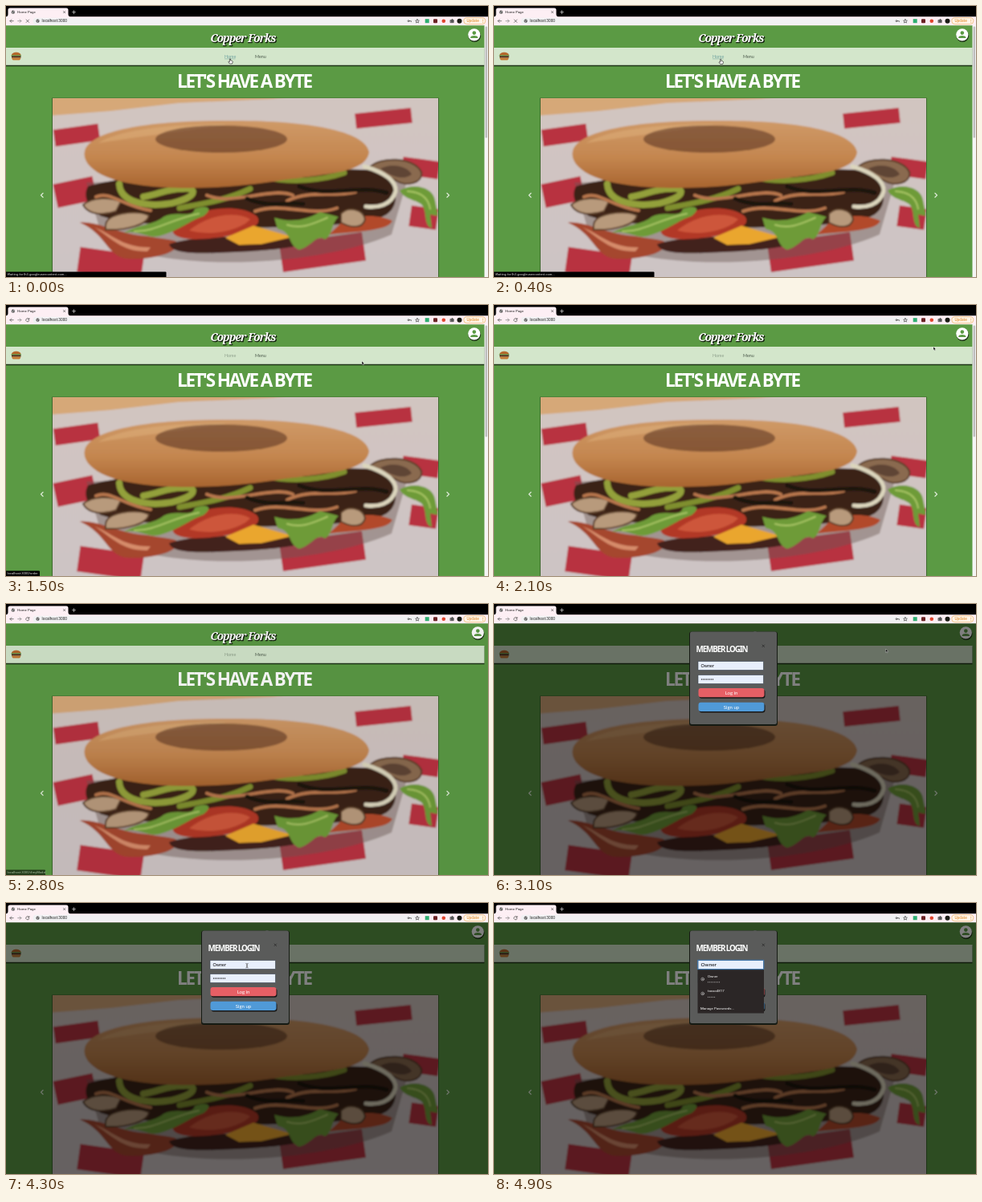
These frames come from a looping animation (600 by 338 pixels, 5000 ms). An HTML page:

```html
<!DOCTYPE html>
<html lang="en">
<head>
<meta charset="utf-8">
<title>Home Page</title>
<style>
html, body { margin: 0; width: 100%; height: 100%; overflow: hidden; background: #000; }
svg { display: block; width: 100%; height: 100%; }
text { font-family: Lato, sans-serif; font-size: 5.4px; }
.ui { font-family: Roboto, sans-serif; font-size: 4.8px; }
.small { font-family: Roboto, sans-serif; font-size: 4.4px; fill: #fff; }
.head { font: 800 22.4px "Noto Sans", sans-serif; letter-spacing: -2.1px; text-anchor: middle; fill: #fff; }
.login { font: 800 9.8px "Noto Sans", sans-serif; letter-spacing: -1.1px; fill: #fff; }
.brand { font: italic 700 14px "Noto Serif", serif; letter-spacing: -1.1px; text-anchor: middle; }
.mid { text-anchor: middle; fill: #fff; font-size: 6px; }
.line { fill: none; stroke-linecap: round; stroke-linejoin: round; }
#tab { font-size: 4.4px; }
#link { font-size: 4.1px; }
</style>
</head>
<body>
<svg viewBox="0 0 600 338" preserveAspectRatio="none">
  <defs>
    <linearGradient id="bun" x2="0" y2="1">
      <stop offset="0" stop-color="#cf9a68"/><stop offset=".55" stop-color="#c4864f"/><stop offset="1" stop-color="#a8642f"/>
    </linearGradient>
    <linearGradient id="paper" x2="0" y2="1">
      <stop offset="0" stop-color="#d2c5c0"/><stop offset="1" stop-color="#cdc4c5"/>
    </linearGradient>
    <filter id="soft"><feGaussianBlur stdDeviation="1"/></filter>
    <clipPath id="frame"><path d="M58 115H538V338H58z"/></clipPath>
    <g id="globe"><circle r="2.1" fill="#444"/><path d="M-1.4 -.6L0 0L-.4 1.4M.6 -1.3L1.4 -.2" class="line" stroke="#fff" stroke-width=".6"/></g>
    <g id="key" class="line" stroke="#bbb" stroke-width=".6"><circle r="1.9"/><path d="M0 -1V.4M-.7 .5H.7"/></g>
  </defs>

  <!-- page -->
  <path fill="#5b9a44" d="M0 24H600V338H0z"/>
  <text class="brand" x="295.800" y="46.400" fill="#16240f" stroke="#16240f" stroke-width=".7">Copper Forks</text>
  <text class="brand" x="294.900" y="45.200" fill="#fff">Copper Forks</text>
  <path fill="#1e3317" d="M0 53H595.5V75.2H0z"/>
  <path fill="#d3e6cb" d="M0 52H595.5V73.8H0z"/>
  <path fill="#b5682c" d="M7 61.5C7 56.5 18.5 56.5 18.5 61.5z"/>
  <path fill="#4f8a2c" d="M6.6 61.3H18.8V62.6H6.6z"/>
  <path fill="#4b2416" d="M7 62.5H18.5V64.5H7z"/>
  <path fill="#c37a35" d="M7.2 64.5H18.3Q18.3 67.6 15.5 67.6H10Q7.2 67.6 7.2 64.5z"/>
  <text id="home" x="272" y="64.8">Home</text>
  <path id="under" d="M272 65.9H285.5" stroke="#6fa3a0" stroke-width=".5"/>
  <text x="310" y="64.8" fill="#4a584a">Menu</text>
  <g id="account">
    <circle cx="583.3" cy="37.3" r="7.8" fill="#1e3317"/>
    <circle cx="582.8" cy="35.8" r="7.6" fill="#fff"/>
    <circle cx="582.8" cy="33.6" r="2.3" fill="#5b9a44"/>
    <path fill="#5b9a44" d="M578.2 40V39.2C578.2 36.2 587.4 36.2 587.4 39.2V40z"/>
  </g>
  <text class="head" x="296.5" y="102.3">LET'S HAVE A BYTE</text>

  <!-- picture -->
  <path fill="#2c4a20" opacity=".6" d="M57 114.5H539V338H57z"/>
  <g clip-path="url(#frame)"><g filter="url(#soft)">
    <path fill="url(#paper)" d="M50 105H550V345H50z"/>
    <path fill="#d6a878" d="M50 105H420L330 116L215 121L130 131L50 137z"/>
    <g id="patches" fill="#b8303f"></g>
    <path fill="#6d5a55" opacity=".45" d="M120 290C200 335 390 325 480 285L500 215L100 220z"/>
    <path fill="#3a2217" d="M102 225C160 205 400 200 462 205C490 220 492 252 470 262C430 282 170 280 118 262C100 250 96 236 102 225z"/>
    <path fill="#a5462f" d="M92 270C115 268 140 285 175 287C200 292 218 290 213 300C205 312 170 317 148 315C125 310 125 285 92 270z"/>
    <path fill="#d68c6b" d="M110 276C130 283 145 302 180 301L176 306C145 307 132 290 110 276z"/>
    <path fill="#43201b" d="M203 297C240 284 320 288 372 290C385 300 330 306 262 308C230 309 206 308 203 297z"/>
    <path fill="#b23725" d="M208 277C230 252 290 244 312 262C325 278 280 290 235 291C215 290 205 286 208 277z"/>
    <path fill="#cd573b" d="M228 280C250 261 285 255 304 266C292 279 258 288 228 280z"/>
    <path fill="#b24a2c" d="M420 268C445 258 470 262 481 268C476 280 442 281 402 285z"/>
    <path fill="#eaa62f" d="M273 289L308 274L357 288L318 297L290 298z"/>
    <g fill="#b89a7c" stroke="#5a3c28" stroke-width="2">
      <path d="M124 273C126 258 162 254 178 261C176 273 150 280 124 279z"/>
      <path d="M96 248C108 238 130 238 143 244L137 256C120 262 102 260 96 248z"/>
      <path d="M417 259C427 249 445 254 447 266C444 279 427 276 417 270z"/>
      <path fill="#8a6a50" d="M452 202C465 187 508 188 517 207C520 221 497 226 486 218z"/>
    </g>
    <path fill="#5f4436" d="M466 203C480 195 500 200 505 210C495 218 480 213 466 203z"/>
    <g class="line">
      <path stroke="#93a03a" stroke-width="8" d="M141 222C142 246 178 251 206 246C238 239 240 226 220 228C200 228 190 235 171 238"/>
      <path stroke="#7f8f2e" stroke-width="7" d="M216 252C248 246 275 242 304 228M318 212C355 222 395 217 421 208"/>
      <path stroke="#b9774d" stroke-width="4" d="M112 238C130 230 145 250 180 255M250 236C280 250 330 225 357 236M350 243C380 229 405 239 435 232M310 256C345 244 380 264 412 252"/>
      <path stroke="#1e1310" stroke-width="5" d="M300 240C325 252 350 244 370 247M365 225C400 240 440 222 474 233"/>
      <path stroke="#dcd6bd" stroke-width="5" d="M446 200C475 209 486 220 485 231C480 249 462 252 448 250"/>
    </g>
    <g fill="#6e9b39">
      <path d="M147 283C165 272 185 273 196 263C214 254 232 266 235 253C250 247 259 252 246 262C228 268 217 279 194 286C178 292 165 278 147 283z"/>
      <path d="M334 264C360 272 378 264 391 257L414 263C405 270 407 286 397 291C386 284 382 299 365 304C350 298 357 282 338 278z"/>
      <path d="M490 230C508 220 531 226 534 242L538 262L528 260L530 277C518 273 526 252 515 246C506 241 495 240 490 230z"/>
    </g>
    <path class="line" stroke="#a9c565" stroke-width="2" d="M160 281C185 282 208 265 240 259M350 273C370 279 385 270 400 264M500 231C518 232 526 241 528 253"/>
    <path fill="url(#bun)" d="M98 181C105 156 172 143 275 143C367 142 447 154 452 182C449 207 405 209 345 217C274 229 174 233 125 213C106 205 95 193 98 181z"/>
    <path fill="#e1b37f" opacity=".45" d="M115 171C145 151 230 147 275 148C220 157 155 164 115 171z"/>
    <ellipse cx="268" cy="166" rx="82" ry="17" fill="#4a2718" opacity=".5"/>
  </g></g>
  <path class="line" stroke="#d9e8d2" stroke-width="1.3" d="M46 233.5L43.5 236L46 238.5M549 233.5L551.5 236L549 238.5"/>

  <g id="scroll">
    <path fill="#f5f5f5" d="M595.5 24H600V338H595.5z"/>
    <rect x="596.6" y="25.5" width="2.5" height="139" rx="1.2" fill="#bdbdbd"/>
  </g>
  <path id="shade" d="M0 24H600V338H0z"/>

  <!-- dialog -->
  <g id="dialog">
    <rect x="243" y="34.5" width="110" height="117.5" rx="3" fill="#151a13"/>
    <rect x="244" y="34.5" width="108" height="115.5" rx="2.5" fill="#5a5b5a"/>
    <text class="login" x="251.5" y="60.3">MEMBER LOGIN</text>
    <path class="line" stroke="#222" stroke-width=".7" d="M334 51L336.6 53.6M336.6 51L334 53.6"/>
    <path fill="#e8effc" stroke="#38404c" stroke-width=".6" d="M254 71.5H335.5V82.5H254zM254 88.5H335.5V99.5H254z"/>
    <text id="user" x="257.5" y="78.8">Owner</text>
    <g id="dots" fill="#222"></g>
    <rect x="255.5" y="106.5" width="82" height="11.3" rx="3" fill="#171717"/>
    <rect x="254.5" y="105" width="82" height="11.3" rx="3" fill="#e65f65"/>
    <text class="mid" x="295.5" y="112.8">Log in</text>
    <rect x="255.5" y="124.3" width="82" height="11.3" rx="3" fill="#171717"/>
    <rect x="254.5" y="122.8" width="82" height="11.3" rx="3" fill="#509ad8"/>
    <text class="mid" x="295.5" y="130.5">Sign up</text>
    <g id="list">
      <path fill="#2b2626" d="M253.5 83H336V137.5H253.5z"/>
      <path fill="none" stroke="#3f83c4" stroke-width=".9" d="M253.7 71.3H335.8V82.7H253.7z"/>
      <use href="#key" x="259.7" y="95"/><use href="#key" x="259.7" y="113"/>
      <text class="small" x="266" y="93">Owner</text>
      <text class="small" x="266" y="111.3">tasso4817</text>
      <g id="masks" fill="#ddd"></g>
      <text class="small" x="257" y="132.5">Manage Passwords...</text>
    </g>
  </g>

  <!-- browser -->
  <path d="M0 0H600V13H0z"/>
  <path fill="#fdeff4" d="M0 13.2C2 13.2 2.5 12 2.5 10V5Q2.5 2.5 5 2.5H75Q77.5 2.5 77.5 5V10C77.5 12 78 13.2 80 13.2H600V24.3H0z"/>
  <use href="#globe" x="8.8" y="7.7"/>
  <text id="tab" class="ui" x="14" y="9.4" fill="#222">Home Page</text>
  <path class="line" stroke="#333" stroke-width=".6" d="M71.5 6.5L73.7 8.7M73.7 6.5L71.5 8.7"/>
  <path class="line" stroke="#ddd" stroke-width=".7" d="M82.5 7.7H86.5M84.5 5.7V9.7"/>
  <rect x="33.5" y="14.7" width="484" height="8.2" rx="4.1" fill="#f1f1f3"/>
  <g class="line" stroke="#555" stroke-width=".75">
    <path d="M9.2 18.7H5M6.8 16.9L5 18.7L6.8 20.5"/>
    <path stroke="#888" d="M14.7 18.7H18.9M17.1 16.9L18.9 18.7L17.1 20.5"/>
    <path id="stop" d="M25.2 17L28.6 20.4M28.6 17L25.2 20.4"/>
    <path id="reload" d="M28.5 17.4A2.1 2.1 0 1 0 28.9 19.3M28.9 16.5V18H27.4"/>
    <circle cx="501" cy="18.7" r="1"/><path d="M502 18.7H504.4V19.7"/>
    <path d="M512 16.5L512.7 18.1L514.4 18.2L513.1 19.3L513.5 21L512 20.1L510.5 21L510.9 19.3L509.6 18.2L511.3 18.1z"/>
    <path d="M553.3 17.5H555V16.5H556V17.5H557.2V20.7H553.3z" fill="#555"/>
  </g>
  <use href="#globe" x="39.5" y="18.7"/>
  <text class="ui" x="44.5" y="20.4" fill="#222">localhost:3000</text>
  <rect x="521.7" y="16.2" width="5" height="5" fill="#2fae72"/>
  <rect x="532" y="16.2" width="5" height="5" rx="1" fill="#6b2224"/>
  <circle cx="544.8" cy="18.7" r="2.3" fill="#e0452f"/>
  <circle cx="564.5" cy="18.7" r="3" fill="#1b1c16"/>
  <rect x="569.8" y="14.7" width="27" height="8" rx="4" fill="#fff5e9" stroke="#eda64c" stroke-width=".6"/>
  <text class="ui" x="573.5" y="20.4" fill="#df8620">Update</text>
  <path stroke="#df8620" stroke-width=".8" stroke-dasharray=".8 .8" d="M593.7 16.7V21"/>

  <g id="status">
    <path id="bubble"/>
    <text id="link" class="ui" x="1.5" y="336.4" fill="#ddd"></text>
  </g>

  <g id="cursor">
    <path id="arrow" fill="#000" stroke="#fff" stroke-width=".35" d="M0 0V4.3L1 3.4L1.7 4.9L2.4 4.6L1.7 3.2H3z"/>
    <path id="hand" fill="#fff" stroke="#111" stroke-width=".6" d="M-.6 0Q0 -.6 .6 0V2L2.7 2.5Q3.4 2.8 3.2 3.7L2.5 6H-.6L-2.2 3.7Q-2 2.7 -.6 3.7z"/>
    <path id="beam" class="line" stroke="#555" stroke-width=".7" d="M-1.2 -2.5Q0 -2.5 0 -1.7V2Q0 2.8 -1.2 2.8M1.2 -2.5Q0 -2.5 0 -1.7V2Q0 2.8 1.2 2.8"/>
  </g>
</svg>
<script>
const $ = id => document.getElementById(id);
const clamp = v => Math.max(0, Math.min(1, v));
const show = (id, alpha) => $(id).setAttribute("opacity", +alpha);
const move = (id, x, y) => $(id).setAttribute("transform", `translate(${x} ${y})`);

// x, y, width, height, angle
const patches = [
  [88, 161, 56, 21, -8], [470, 140, 70, 19, -6], [86, 232, 50, 30, -12], [516, 202, 46, 22, 8],
  [130, 322, 80, 32, 8], [394, 307, 104, 36, -8], [520, 264, 34, 26, 8]
];
$("patches").innerHTML = patches.map(([x, y, w, h, a]) =>
  `<rect x="${-w / 2}" y="${-h / 2}" width="${w}" height="${h}" transform="translate(${x} ${y}) rotate(${a})"/>`).join("");

const dots = (n, x, y, gap, r) => Array.from({ length: n }, (_, i) =>
  `<circle cx="${x + i * gap}" cy="${y}" r="${r}"/>`).join("");
$("dots").innerHTML = dots(8, 258.5, 94, 2, .7);
$("masks").innerHTML = dots(8, 266.6, 98.8, 2, .5) + dots(5, 266.6, 117.2, 2, .5);

// time, x, y
const path = [
  [0, 279, 66], [800, 285.5, 67], [1000, 290, 66], [1500, 443, 70],
  [2100, 547, 52], [2500, 584, 38], [2800, 584, 38], [3600, 327, 86], [4300, 300, 78], [5000, 286, 92]
];
function pointer(t) {
  const i = path.findIndex(p => p[0] > t), [t0, x0, y0] = path[i - 1], [t1, x1, y1] = path[i];
  const k = (t - t0) / (t1 - t0);
  return [x0 + (x1 - x0) * k, y0 + (y1 - y0) * k];
}

// start, fade start, width, text
const links = [
  [0, 700, 199.5, "Waiting for lh3.googleusercontent.com..."],
  [1100, 1500, 42, "localhost:3000/order"],
  [2400, 2700, 49, "localhost:3000/#myModal"]
];

function draw(now) {
  const t = Math.floor(now % 5000 / 100) * 100;
  const loading = t < 500, hover = t < 1000;
  const modal = t >= 2800, fade = clamp((t - 2800) / 150), slide = clamp((t - 2700) / 300);
  const list = t >= 4600, preview = t >= 4900;

  show("stop", loading);
  show("reload", !loading);
  $("home").setAttribute("fill", hover ? "#6fa3a0" : "#8fa08c");
  show("under", hover);
  show("scroll", !modal);
  move("account", modal ? 4.5 : 0, 0);
  show("shade", modal ? Math.max(.05, .5 * fade) : 0);
  show("dialog", fade);
  move("dialog", 0, -17 * (1 - slide) ** 2);
  show("list", list);
  $("user").style.fontSize = preview ? "6.4px" : "5.4px";

  const link = links.find(([a, b]) => t >= a && t < b + 300);
  show("status", link ? 1 - clamp((t - link[1]) / 250) : 0);
  if (link) {
    $("bubble").setAttribute("d", `M0 331.5H${link[2] - 1}Q${link[2]} 331.5 ${link[2]} 332.5V338H0z`);
    $("link").textContent = link[3];
  }

  const hand = hover || t === 1100;
  const beam = t >= 3600;
  move("cursor", ...pointer(t));
  show("cursor", !list && !(t > 2300 && t < 2900));
  show("hand", hand);
  show("beam", beam);
  show("arrow", !hand && !beam);
  requestAnimationFrame(() => draw(performance.now()));
}
draw(0);
</script>
</body>
</html>
```
